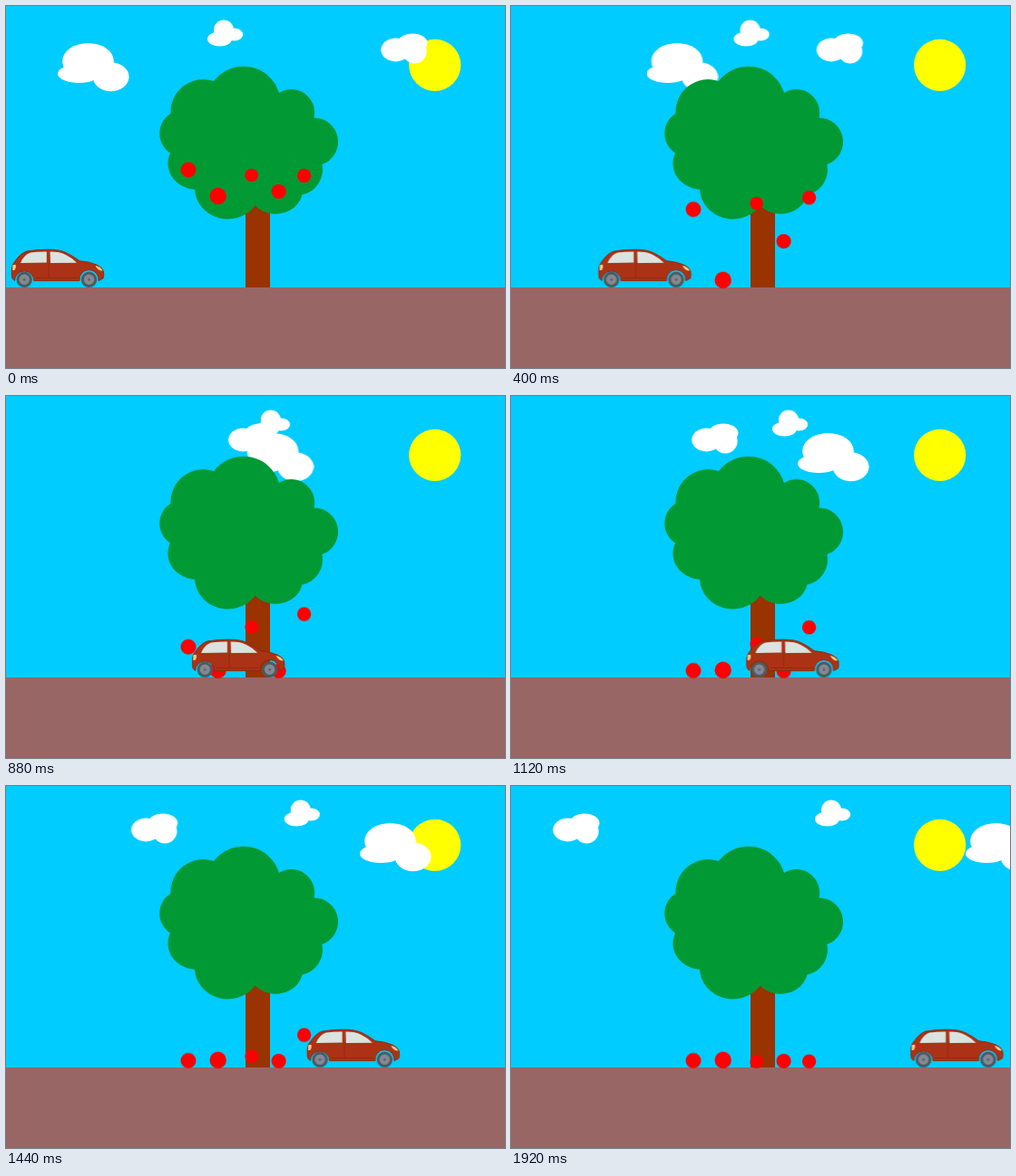
An HTML page for the animation above (2000 ms loop, 550 by 400 pixels).

```html
<!DOCTYPE html>
<html lang="en">
<head>
<meta charset="utf-8">
<title>Apple tree and car</title>
<style>
  html, body { margin: 0; width: 100%; height: 100%; overflow: hidden; background: #0cf; }
  svg { display: block; width: 550px; height: 400px; }
</style>
</head>
<body>
<svg viewBox="0 0 550 400" xmlns="http://www.w3.org/2000/svg">
  <rect width="550" height="400" fill="#0cf"/>
  <circle cx="472.7" cy="65.3" r="28.6" fill="#ff0"/>

  <g fill="#fff">
    <g data-travel="444">
      <ellipse cx="90.5" cy="61" rx="28.3" ry="20"/>
      <ellipse cx="80.3" cy="74.7" rx="23.3" ry="10.3"/>
      <ellipse cx="115.6" cy="78.2" rx="20" ry="16"/>
    </g>
    <g data-travel="113">
      <circle cx="240" cy="26.5" r="11"/>
      <ellipse cx="235.5" cy="36.5" rx="13.5" ry="8"/>
      <ellipse cx="251.5" cy="31.5" rx="9.7" ry="7"/>
    </g>
    <g data-travel="-367">
      <ellipse cx="429.5" cy="48.4" rx="16.2" ry="13"/>
      <ellipse cx="448.1" cy="41.1" rx="16.4" ry="10.7"/>
      <circle cx="450.3" cy="50" r="13.4"/>
    </g>
  </g>

  <path fill="#930" d="M264 200h27v112h-27z"/>
  <path fill="#093" d="M229 83A41 41 0 0 1 301 96A25.6 25.6 0 0 1 339.5 123.5A26.5 26.5 0 0 1 348.3 175
    A28 28 0 0 1 326.5 208.5A30 27 0 0 1 274.6 220.4A36.5 34.5 0 0 1 208 202.8A32 29 0 0 1 181 162.5
    A26 26 0 0 1 181.5 118.7A36 36 0 0 1 229 83Z"/>
  <rect y="311" width="550" height="89" fill="#966"/>

  <!-- In the order in which they land -->
  <g id="apples" fill="#f00">
    <circle cx="233.7" cy="210" r="9.2"/>
    <circle cx="300.6" cy="205" r="8.1"/>
    <circle cx="201" cy="181" r="8.5"/>
    <circle cx="270.6" cy="187" r="7.3"/>
    <circle cx="328.6" cy="187.5" r="7.7"/>
  </g>

  <g data-travel="434.4">
    <path fill="#ac3216" stroke="#8f2b0c"
      d="M9.5 303.5Q6.5 302 6.4 298V290Q7 285 10 282Q16 273 23 271Q34 269 46 269.2Q60 269 67 273Q75 277 81 281.7
         Q92 282.5 100 286Q106 288.5 107.4 293Q108.3 298 107 301L102 303.6
         A10.6 10.6 0 1 0 81 303.6H30.8A10.6 10.6 0 1 0 9.5 303.5Z"/>
    <path fill="#d9e3e0" d="M16 284Q20 274.5 27 272.6Q35 271.5 44.8 271.6V283.6ZM48.6 271.6Q60 271.6 66 275Q73 278.5 78 283.7L49 284Z"/>
    <path fill="none" stroke="#8f2b0c" d="M47 284V301M33 300.5H79"/>
    <path fill="#e8cf86" d="M7.3 286.5Q10.5 285 11 287Q11 290 9.3 292H7.2ZM98.5 286.8Q105 288.5 106.6 292.6Q101 293 98.5 286.8Z"/>
    <g id="wheel" fill="#848894" stroke="#4e5a60">
      <circle cx="20.2" cy="302.3" r="7.2" stroke-width="3"/>
      <circle cx="20.2" cy="302.3" r="1.5" fill="#62666f" stroke="none"/>
    </g>
    <use href="#wheel" x="71.3"/>
  </g>
</svg>
<script>
const STEPS = 25, LAST = STEPS - 1, GROUND = 312;
const timing = { duration: 80 * STEPS, iterations: Infinity, easing: `steps(${STEPS}, jump-none)` };

// Moves by (x, y) until the given step, then rests
function move(el, x, y, until = LAST) {
  const end = `translate(${x}px, ${y}px)`;
  el.animate([
    { transform: "translate(0px, 0px)", offset: 0 },
    { transform: end, offset: until / LAST },
    { transform: end, offset: 1 }
  ], timing);
}

for (const el of document.querySelectorAll("[data-travel]")) move(el, el.dataset.travel, 0);

// One apple reaches the ground every fifth step
[...document.querySelectorAll("#apples circle")].forEach((apple, i) => {
  const bottom = apple.cy.baseVal.value + apple.r.baseVal.value;
  move(apple, 0, GROUND - bottom, 5 * i + 4);
});
</script>
</body>
</html>
```
